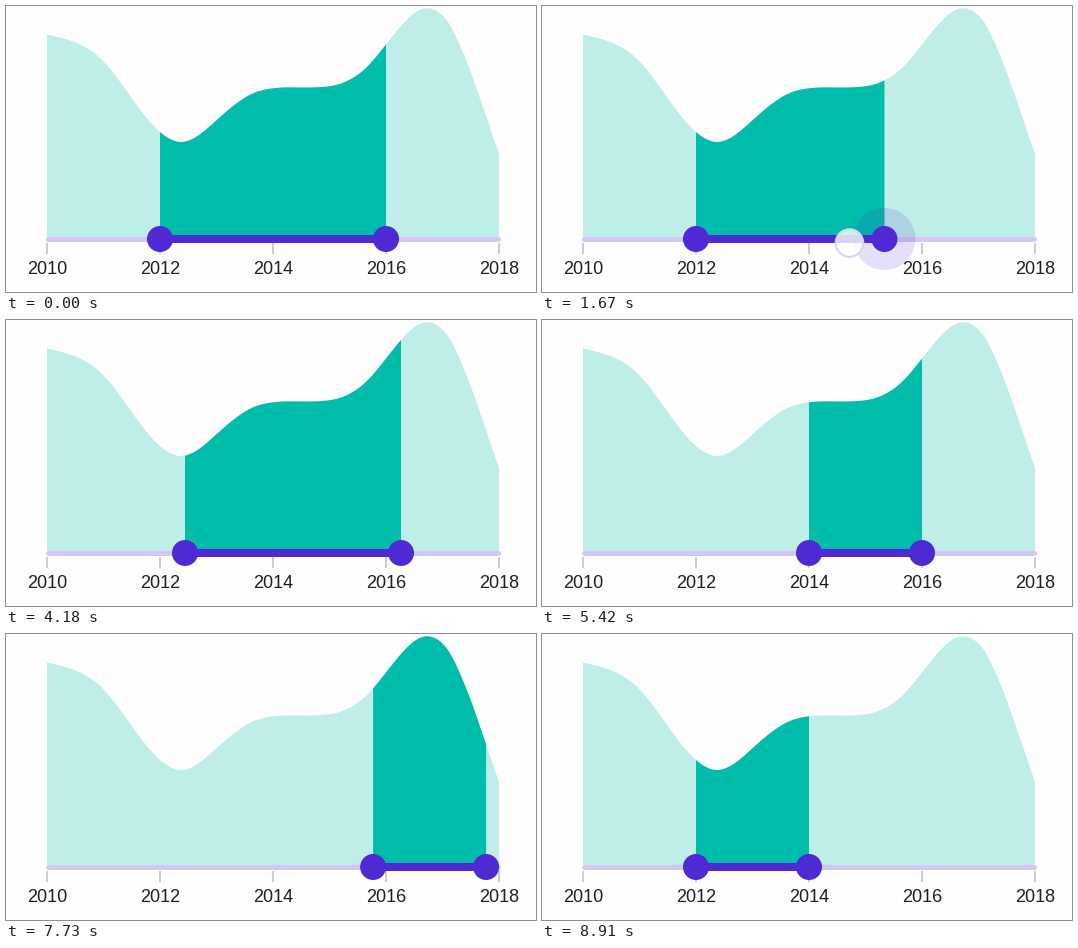
These frames come from a looping animation (530x286 px, 9.7 s). A matplotlib script:

```python
import numpy as np
import matplotlib.pyplot as plt
from matplotlib.animation import FuncAnimation
from matplotlib.patches import Circle, Polygon

W, H, DPI = 530, 286, 100
LOOP, STEP = 9700, 50
PX = 72 / DPI  # one pixel in points

BG, TEAL, PALE = "#fefefe", "#00bdab", "#beeee7"
PURPLE, RAIL, TICK, INK = "#4e29d4", "#d3c8f2", "#bdbdbd", "#202020"
BASE, RAIL_Y = 231, 233

# Curve knots: x, y, slope
KNOTS = np.array([
    (41, 28.5, .24), (98, 56, 1.05), (154, 126, .85), (175, 136, 0),
    (213, 112, -.9), (240, 91, -.6), (267, 82.3, -.12), (300, 81.5, 0),
    (325, 80, -.15), (350, 70, -.65), (367, 54.5, -1.15), (380, 38.5, -1.27),
    (395, 20, -1.15), (421, 2.3, 0), (440, 13.5, 1.25), (460, 54, 2.45),
    (480, 110, 2.9), (493, 148, 2.9)])


def curve(x):
    """Cubic Hermite interpolation through the knots."""
    kx, ky, km = KNOTS.T
    i = np.clip(np.searchsorted(kx, x, side="right") - 1, 0, len(kx) - 2)
    h = kx[i + 1] - kx[i]
    u = (x - kx[i]) / h
    return ((1 + 2 * u) * (1 - u) ** 2 * ky[i] + u * (1 - u) ** 2 * h * km[i]
            + u * u * (3 - 2 * u) * ky[i + 1] + u * u * (u - 1) * h * km[i + 1])


def area(x0, x1):
    x = np.linspace(x0, x1, max(8, int(x1 - x0)))
    top = np.column_stack([x, curve(x)])
    return np.vstack([top, (x1, BASE), (x0, BASE)])


def smooth(u):
    return u * u * (3 - 2 * u)


S = np.linspace(0, 1, 200)
BEZ_X = 1.2 * (1 - S) ** 2 * S + .6 * (1 - S) * S ** 2 + S ** 3


def glide(u):
    """Fast-out, slow-in easing."""
    return np.interp(u, BEZ_X, smooth(S))


def ramp(t, t0, t1):
    return float(np.clip((t - t0) / (t1 - t0), 0, 1))


# Moves: start, end, destination, easing
LEFT = [(2360, 2800, 257, smooth), (2870, 3120, 179, smooth),
        (4700, 5400, 267, glide), (6200, 6900, 154, glide),
        (7210, 7900, 380, glide), (8210, 8900, 154, glide)]
RIGHT = [(1180, 1460, 298, smooth), (1480, 1840, 395, smooth),
         (4700, 5400, 380, glide), (6200, 6900, 267, glide),
         (7210, 7900, 493, glide), (8210, 8900, 267, glide)]

# Drags: finger down, press, release, which handle, finger offset, finger y
DRAGS = [(910, 1060, 1860, 1, -35, 237), (2130, 2220, 3270, 0, 32, 242)]
# Taps: finger down, finger up, x, y
TAPS = [(4390, 4700, 324, 258), (6050, 6220, 210, 257),
        (7050, 7220, 424.5, 257), (8150, 8230, 210, 257)]


def position(t, start, moves):
    x = start
    for t0, t1, dest, ease in moves:
        x += (dest - x) * ease(ramp(t, t0, t1))
    return x


fig = plt.figure(figsize=(W / DPI, H / DPI), dpi=DPI, facecolor=BG)
ax = fig.add_axes([0, 0, 1, 1])
ax.set(xlim=(0, W), ylim=(H, 0))
ax.axis("off")

ax.add_patch(Polygon(area(41, 493), fc=PALE, lw=0, zorder=1))
for k in range(5):
    x = 41 + 113 * k
    ax.plot([x, x], [237, 247.5], color=TICK, lw=1.5 * PX, zorder=1,
            solid_capstyle="butt")
    ax.text(x + .5, 268, str(2010 + 2 * k), color=INK, ha="center",
            va="baseline", family="Liberation Sans", size=18 * PX)
ax.plot([41.5, 492], [RAIL_Y] * 2, color=RAIL, lw=5 * PX, zorder=3,
        solid_capstyle="round")

chosen = ax.add_patch(Polygon(area(154, 380), fc=TEAL, lw=0, zorder=2))
bar, = ax.plot([154, 380], [RAIL_Y] * 2, color=PURPLE, lw=8 * PX, zorder=4)
handles = [ax.add_patch(Circle((x, RAIL_Y), 13, fc=PURPLE, lw=0, zorder=6))
           for x in (154, 380)]
halos = [ax.add_patch(Circle((x, RAIL_Y), 13, fc=PURPLE, lw=0, alpha=0, zorder=5))
         for x in (154, 380)]
finger = ax.add_patch(Circle((0, 0), 13.8, fc=(1, 1, 1, .8), ec="#d5d6ee",
                             lw=2 * PX, zorder=7))


def show_finger(x, y, alpha):
    finger.center = x, y
    finger.set_facecolor((1, 1, 1, .8 * alpha))
    finger.set_edgecolor((.835, .84, .933, alpha))
    finger.set_visible(alpha > 0)


def draw(i):
    t = i * STEP
    ends = position(t, 154, LEFT), position(t, 380, RIGHT)
    chosen.set_xy(area(*ends))
    bar.set_xdata(ends)
    for x, handle, halo in zip(ends, handles, halos):
        handle.center = halo.center = x, RAIL_Y
        halo.set_alpha(0)

    finger.set_visible(False)
    for down, press, up, side, offset, y in DRAGS:
        fade = 1 - ramp(t, up, up + 260)
        if t >= down and fade > 0:
            show_finger(ends[side] + offset, y, fade)
            halos[side].set_radius(13 + 18 * ramp(t, press, press + 200))
            halos[side].set_alpha(.14 * fade * (t >= press))
    for down, up, x, y in TAPS:
        fade = 1 - ramp(t, up, up + 200)
        if t >= down and fade > 0:
            show_finger(x, y, fade)
    return [chosen, bar, *handles, *halos, finger]


anim = FuncAnimation(fig, draw, frames=LOOP // STEP, interval=STEP,
                     repeat=True, repeat_delay=0, blit=False)
plt.show()
```
